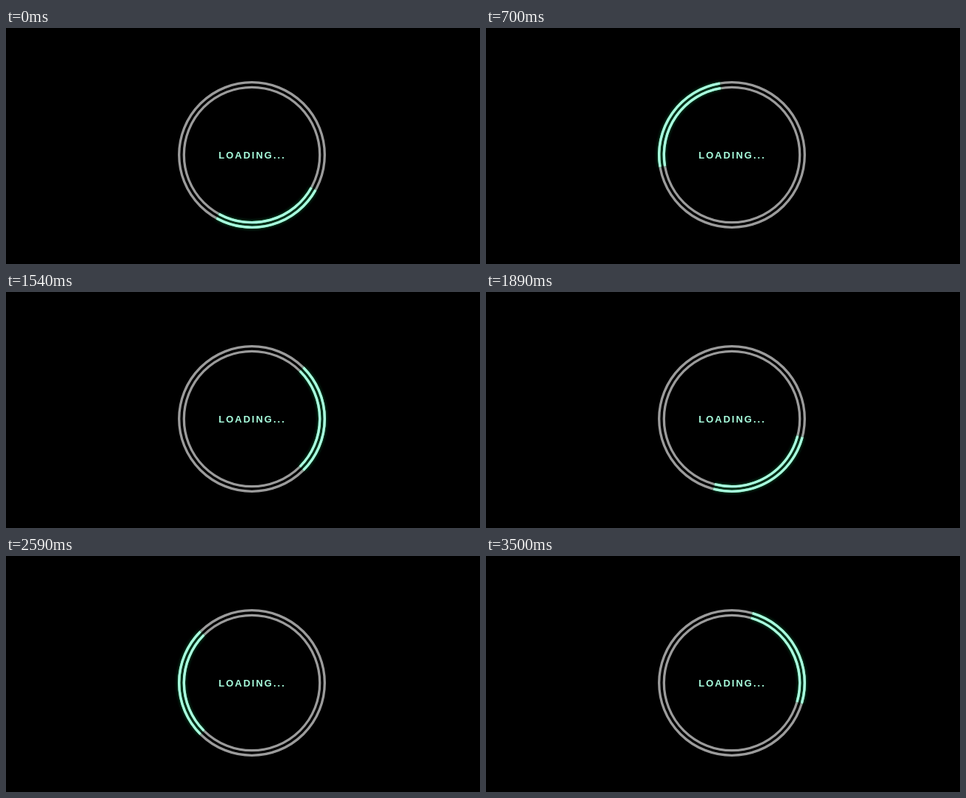
An HTML page with a canvas for the animation above (3.57 s loop, 640x320 px).

```html
<!DOCTYPE html>
<html lang="en">
<head>
<meta charset="utf-8">
<title>Loading</title>
<style>
  html, body { margin: 0; width: 100%; height: 100%; overflow: hidden; background: #000; }
  canvas { display: block; }
</style>
</head>
<body>
<canvas id="stage" width="640" height="320"></canvas>
<script>
const ctx = document.getElementById('stage').getContext('2d');
const LOOP = 3570, STEP = 70;
const CX = 332, CY = 172, RADII = [98.3, 91.7], LINE = 3.3;
const GREY = '#9b9b9b', MINT = '#a9ffdf';

// [time in ms, direction of the arc's middle in degrees]
const KEYS = [[0, 74], [700, 215.5], [1540, 360], [2240, 479.3], [2590, 540], [3220, 644], [3500, 691.4]];

function angleAt(time) {
  let i = 1;
  while (i < KEYS.length - 1 && time > KEYS[i][0]) i++;
  const [t0, a0] = KEYS[i - 1], [t1, a1] = KEYS[i];
  return a0 + (a1 - a0) * (time - t0) / (t1 - t0);
}

function strokeRings(from, to, color) {
  ctx.strokeStyle = color;
  ctx.lineWidth = LINE;
  for (const radius of RADII) {
    ctx.beginPath();
    ctx.arc(CX, CY, radius, from, to);
    ctx.stroke();
  }
}

function drawLabel() {
  ctx.font = 'bold 13px "Liberation Sans", Arial, sans-serif';
  ctx.letterSpacing = '2px';
  ctx.textBaseline = 'alphabetic';
  ctx.fillStyle = MINT;
  ctx.fillText('LOADING...', 287, 177.4);
}

function draw(time) {
  ctx.fillStyle = '#000';
  ctx.fillRect(0, 0, 640, 320);
  strokeRings(0, Math.PI * 2, GREY);

  const middle = angleAt(time) * Math.PI / 180;
  ctx.save();
  ctx.shadowColor = 'rgba(0, 200, 110, 0.55)';
  ctx.shadowBlur = 4;
  strokeRings(middle - Math.PI / 4, middle + Math.PI / 4, MINT);
  ctx.restore();

  drawLabel();
}

function tick() {
  const time = performance.now() % LOOP;
  draw(Math.floor(time / STEP) * STEP);
  requestAnimationFrame(tick);
}
tick();
</script>
</body>
</html>
```
